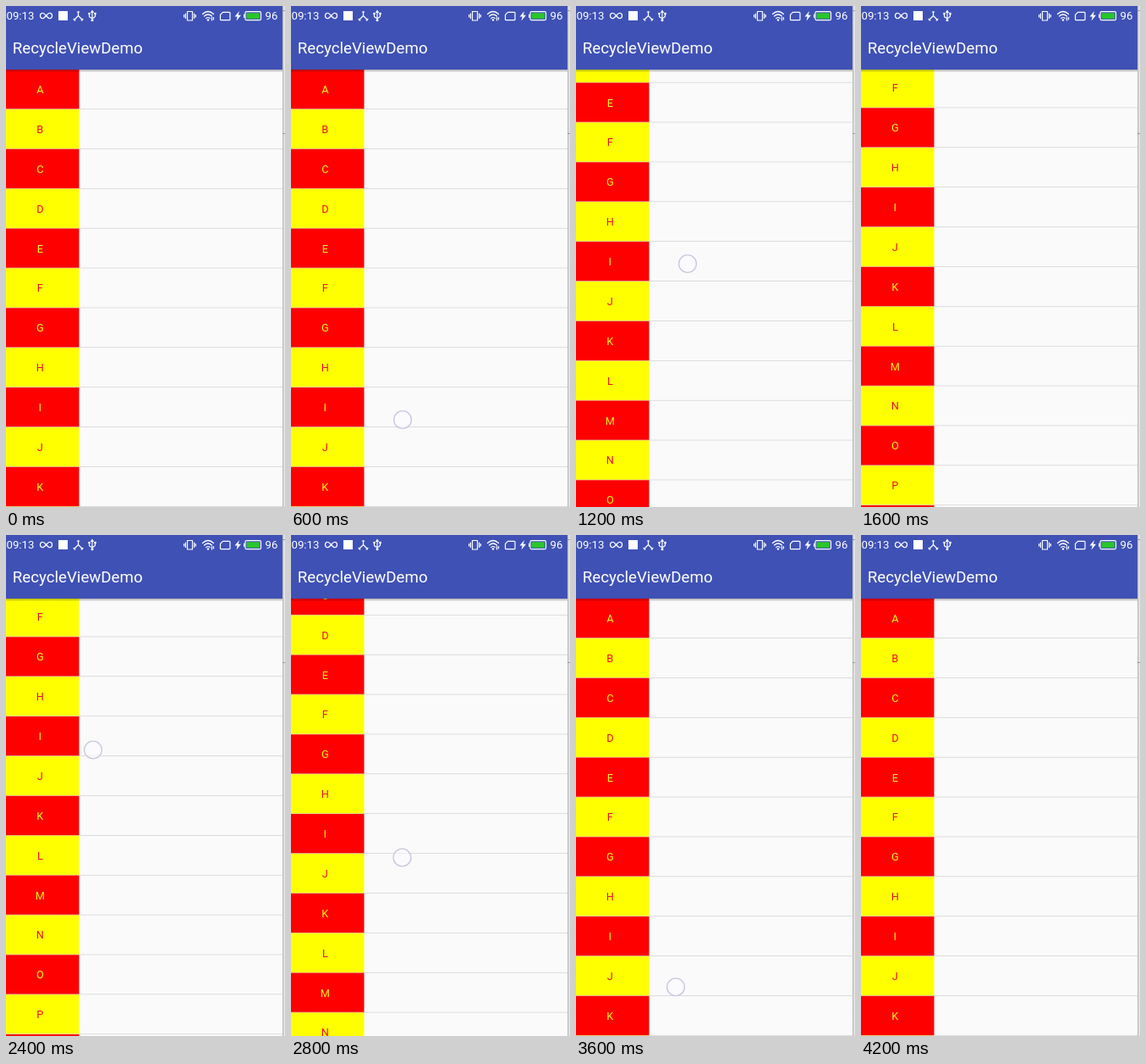
Write an HTML page that moves like this. It is 330x591 px and loops after 4.8 s.

```html
<!DOCTYPE html>
<html lang="en">
<head>
<meta charset="utf-8">
<title>RecycleViewDemo</title>
<style>
  html, body { margin: 0; width: 100%; height: 100%; overflow: hidden; background: #fff; }
  svg { display: block; width: 330px; height: 591px; font-family: Roboto, sans-serif; }
  .icon { fill: none; stroke: #fff; stroke-width: 1.2; stroke-linecap: round; stroke-linejoin: round; }
  .solid { fill: #fff; stroke: none; }
  .letter { font-size: 12.7px; text-anchor: middle; }
</style>
</head>
<body>
<svg viewBox="0 0 330 591">
  <defs>
    <clipPath id="viewport"><rect y="75" width="327" height="516"/></clipPath>
    <linearGradient id="shade" x2="0" y2="1">
      <stop stop-color="#000" stop-opacity=".3"/>
      <stop offset="1" stop-color="#000" stop-opacity="0"/>
    </linearGradient>
    <linearGradient id="edge">
      <stop stop-color="#b4b4b4"/>
      <stop offset="1" stop-color="#f4f4f4"/>
    </linearGradient>
  </defs>

  <rect width="327" height="591" fill="#fafafa"/>
  <g clip-path="url(#viewport)">
    <g id="list"></g>
    <rect y="75" width="327" height="3.5" fill="url(#shade)"/>
    <circle id="touch" r="10.4" fill="#fcfcff" fill-opacity=".6" stroke="#c9c9e0" stroke-width="1.4"/>
  </g>
  <rect x="327" width="3" height="591" fill="url(#edge)"/>
  <path d="M327 5.5H330M327 150.5H330" stroke="#999"/>

  <rect width="327" height="75" fill="#3f51b5"/>
  <g fill="#fff">
    <text x=".5" y="16" font-size="13.2">09:13</text>
    <text x="306.5" y="16" font-size="13.2">96</text>
    <text x="7.8" y="56" font-size="18.7">RecycleViewDemo</text>
  </g>
  <g class="icon">
    <path d="M47.5 11.5C45 8.5 43.8 8 42.8 8.300C39.7 9 39.7 14 42.8 14.700C43.8 15 45 14.5 47.5 11.5S51.2 8 52.2 8.300C55.3 9 55.3 14 52.2 14.700C51.2 15 50 14.5 47.5 11.5Z"/>
    <rect class="solid" x="62" y="6" width="11" height="11"/>
    <path d="M85.5 6.5V11.5L80.5 16.5M85.5 11.5L90.5 16.5M84.3 7H86.7M80 15.3L81.8 17M91 15.3L89.2 17"/>
    <path d="M102 6V17M98.5 9V12Q98.5 13.5 102 14.5Q105.5 13.5 105.5 11.5V9"/>
    <path class="solid" d="M99.8 8L102 4.5L104.2 8Z"/>
    <circle class="solid" cx="102" cy="16.7" r="1.5"/>
    <circle class="solid" cx="98.5" cy="9" r="1.3"/>
    <rect class="solid" x="104.3" y="7.8" width="2.4" height="2.4"/>
    <path d="M214.5 6.5H220.5V17H214.5ZM212.4 9V14.5M222.6 9V14.5M210.6 10.5V13M224.4 10.5V13"/>
    <path d="M232.5 9.5Q239 3.5 245.5 9.5M234.5 12Q239 8 243.5 12M236.7 14.5Q239 12.5 241.3 14.5M243.5 13.5V17M245.5 16V13.5"/>
    <circle class="solid" cx="239" cy="16.5" r="1.2"/>
    <path d="M256.5 7.3H264Q265 7.3 265 8.3V15.700Q265 16.7 264 16.7H254.5Q253.5 16.7 253.5 15.7V10.300Z"/>
    <path class="solid" d="M276 6L270.5 12.5H273.7L272.5 17.5L278 10.8H274.7Z"/>
    <rect x="283" y="6.7" width="18.5" height="10" rx="1.5"/>
    <path d="M281.7 10V13.5"/>
    <rect x="284.6" y="8.3" width="15.3" height="6.8" fill="#2ac52a" stroke="none"/>
  </g>
</svg>
<script>
const LOOP = 4800, TICK = 200, TOP = 75, PITCH = 46.88, ROWS = 18;
const SLOP = 12, FLING = 14;
const list = document.getElementById('list');
const touch = document.getElementById('touch');

// Finger paths: t, x, y at the turns
const swipeUp = [
  { t: 600, x: 132, y: 488 },
  { t: 1000, x: 137, y: 352 },
  { t: 1200, x: 132, y: 304 },
  { t: 1400, x: 96, y: 254 }
];
const swipeDown = [
  { t: 2400, x: 103, y: 253.5 },
  { t: 2800, x: 131.5, y: 380.5 },
  { t: 3200, x: 136, y: 460.5 },
  { t: 3400, x: 132, y: 502 },
  { t: 3800, x: 104, y: 564.5 },
  { t: 4000, x: 86.5, y: 573 }
];

function fingerAt(path, time) {
  const next = path.findIndex(point => point.t > time);
  if (next < 0) return path.at(-1);
  if (next === 0) return path[0];
  const a = path[next - 1], b = path[next];
  const k = (time - a.t) / (b.t - a.t);
  return { x: a.x + (b.x - a.x) * k, y: a.y + (b.y - a.y) * k };
}

// Distance the list follows the finger, once past the touch slop
function dragged(path, time) {
  const dy = fingerAt(path, time).y - path[0].y;
  return Math.sign(dy) * Math.max(0, Math.abs(dy) - SLOP);
}

const isDown = (path, time) => time >= path[0].t && time <= path.at(-1).t;

function scrollAt(time) {
  const fling = time > swipeUp.at(-1).t ? FLING : 0;
  const offset = fling - dragged(swipeUp, time) - dragged(swipeDown, time);
  return Math.max(0, Math.round(offset));
}

list.innerHTML = Array.from({ length: ROWS }, (_, i) => {
  const [back, ink] = i % 2 ? ['#ff0', '#e8102c'] : ['#f00', '#e8f820'];
  const y = TOP + i * PITCH;
  return `<rect y="${y}" width="86.5" height="${PITCH}" fill="${back}"/>
    <rect y="${y + PITCH - .7}" width="327" height=".7" fill="#d0d0d0"/>
    <text class="letter" x="40.3" y="${y + 28}" fill="${ink}">${String.fromCharCode(65 + i)}</text>`;
}).join('');

function draw(now) {
  const time = Math.floor(now % LOOP / TICK) * TICK;
  const path = [swipeUp, swipeDown].find(swipe => isDown(swipe, time));
  list.setAttribute('transform', `translate(0 ${-scrollAt(time)})`);
  touch.setAttribute('visibility', path ? 'visible' : 'hidden');
  if (path) {
    const { x, y } = fingerAt(path, time);
    touch.setAttribute('transform', `translate(${x} ${y})`);
  }
  requestAnimationFrame(draw);
}
draw(0);
</script>
</body>
</html>
```
